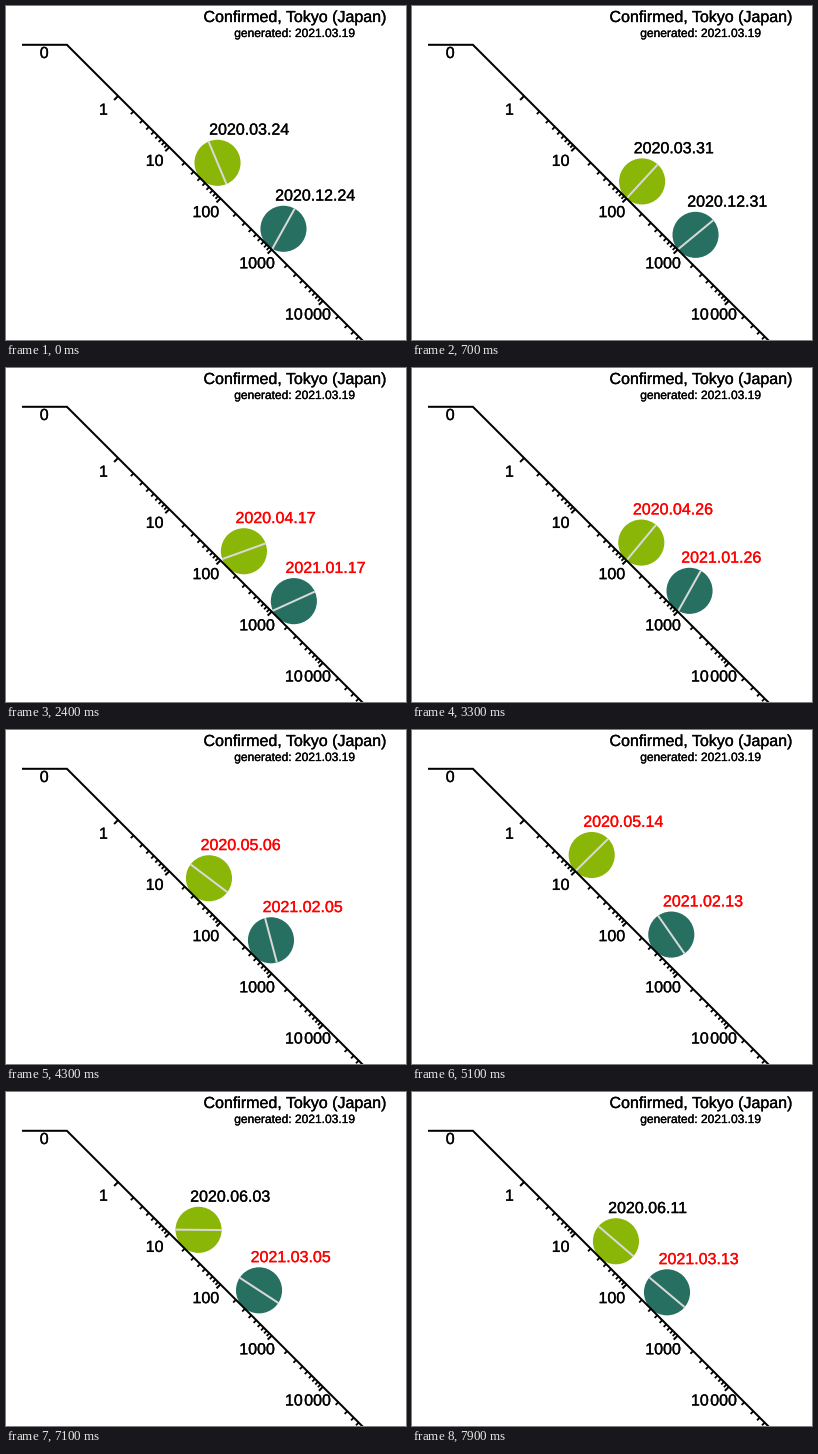
A matplotlib script for the animation above (8 s loop, 400 px wide and 334 px high).

```python
import numpy as np
import matplotlib.pyplot as plt
from matplotlib.animation import FuncAnimation
from matplotlib.patches import Circle
from matplotlib.patheffects import withStroke

W, H, DPI = 400, 334, 100
DAYS = 80
DECADE = 51.2                       # horizontal pixels per power of ten
X0, Y0 = 60.9, 38.8                 # corner where the slope starts
R = DECADE * np.sqrt(2) / np.pi     # half a turn per decade
GREEN, TEAL, STROKE = "#8ab608", "#266f61", "#d9d9d9"

# Turning points of the weekly mean: (day, cases); exponential in between
SPRING = [(0, 42), (7, 97), (15, 167), (20, 150), (25, 135), (32, 89),
          (35, 103), (38, 89), (43, 28.6), (50, 12), (54, 5.9), (59, 9),
          (61, 13), (64, 16.3), (69, 21), (71, 17.9), (75, 18.3), (79, 29.9)]
WINTER = [(0, 816), (4, 855), (7, 1072), (10, 1668), (12, 1830), (15, 1650),
          (22, 1513), (26, 1119), (33, 818), (38, 601), (43, 465), (45, 388),
          (51, 360), (58, 268), (67, 255), (77, 299), (79, 297)]

plt.rcParams.update({"font.family": "Liberation Sans", "toolbar": "None"})
fig = plt.figure(figsize=(W / DPI, H / DPI), dpi=DPI, facecolor="white")
ax = fig.add_axes([0, 0, 1, 1])
ax.set(xlim=(0, W), ylim=(H, 0))
ax.axis("off")


def px(n):
    """Pixels to points."""
    return n * 72 / DPI


def paint(text, color):
    """Colour a text and thicken its letters slightly."""
    text.set_color(color)
    text.set_path_effects([withStroke(linewidth=px(0.3), foreground=color)])


def label(x, y, s, size=16, ha="center"):
    text = ax.text(x, y, s, fontsize=px(size), ha=ha, va="baseline", zorder=4)
    paint(text, "black")
    return text


def stroke(xs, ys, width=2, color="black", z=3):
    return ax.plot(xs, ys, color=color, lw=px(width), zorder=z,
                   solid_capstyle="butt", solid_joinstyle="miter")[0]


def on_slope(log_value):
    d = DECADE * (1 + log_value)
    return X0 + d, Y0 + d


def tick(value, length, width):
    x, y = on_slope(np.log10(value))
    stroke([x, x - length], [y, y + length], width)


def draw_axis():
    stroke([16, X0, X0 + 320], [Y0, Y0, Y0 + 320])
    label(38.2, 52, "0")
    for k in range(5):
        tick(10 ** k, 4, 2)
        for m in range(2, 10):
            tick(m * 10 ** k, 2.7, 1.8)
        x, y = on_slope(k)
        x, y = x - 14.7, y + 18.7
        if k < 4:
            label(x, y, str(10 ** k))
        else:
            label(x - 5.5, y, "10", ha="right")
            label(x - 4, y, "000", ha="left")


class Ball:
    def __init__(self, points, start, color, alert):
        days, cases = zip(*points)
        self.logs = np.interp(range(DAYS), days, np.log10(cases))
        self.start = np.datetime64(start)
        self.alert = [np.datetime64(d) for d in alert]
        self.disc = ax.add_patch(Circle((0, 0), R, fc=color, lw=0, zorder=1))
        self.bar = stroke([], [], 2, STROKE, 2)
        self.date = label(0, 0, "")

    def show(self, i):
        v = self.logs[i]
        x, y = on_slope(v)
        x, y = x + R / np.sqrt(2), y - R / np.sqrt(2)
        a = np.pi * (v - 0.25)
        dx, dy = R * np.cos(a), R * np.sin(a)
        self.disc.center = x, y
        self.bar.set_data([x - dx, x + dx], [y - dy, y + dy])

        day = self.start + i
        first, last = self.alert
        self.date.set_position((x + 31.5, y - 28.2))
        self.date.set_text(str(day).replace("-", "."))
        paint(self.date, "red" if first <= day <= last else "black")
        return self.disc, self.bar, self.date


draw_axis()
label(289, 16, "Confirmed, Tokyo (Japan)")
label(289, 31, "generated: 2021.03.19", 12)
balls = [
    Ball(SPRING, "2020-03-24", GREEN, ("2020-04-07", "2020-05-25")),
    Ball(WINTER, "2020-12-24", TEAL, ("2021-01-08", "2021-03-21")),
]


def update(i):
    return [part for ball in balls for part in ball.show(i)]


anim = FuncAnimation(fig, update, frames=DAYS, interval=100,
                     repeat=True, repeat_delay=0, blit=False)
plt.show()
```
